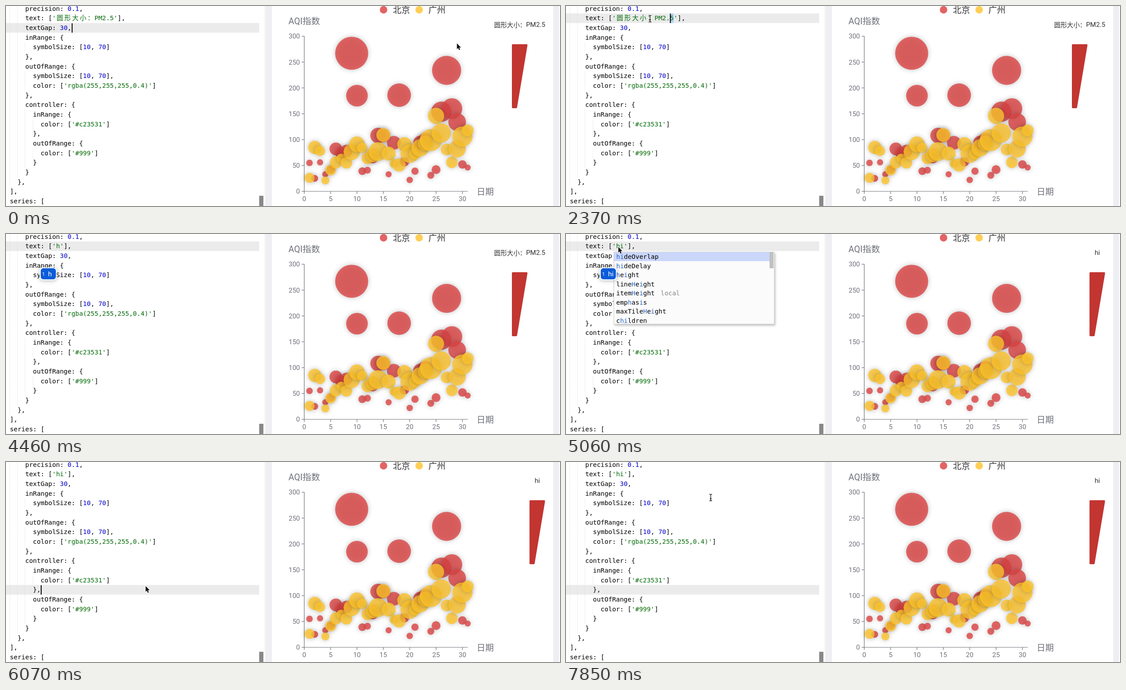
These frames come from a looping animation (1244 px wide and 450 px high, 8 s). An HTML page with a canvas:

```html
<!DOCTYPE html>
<html lang="zh">
<head>
<meta charset="utf-8">
<title>Chart editor</title>
<style>
html, body { margin: 0; width: 100%; height: 100%; overflow: hidden; background: #fff; }
canvas { display: block; }
</style>
</head>
<body>
<canvas id="stage" width="1244" height="450"></canvas>
<script>
const LOOP = 8000, TICK = 148.2;
const CELL = 8.64, ROW = 21.67, LEFT = 8.7, TOP = -5;
const CODE_FONT = '14.35px "DejaVu Sans Mono", monospace';
const sans = size => `${size}px Roboto, "Noto Sans CJK SC", "Noto Sans CJK", sans-serif`;
const cjk = size => `${size}px "Noto Sans CJK SC", "Noto Sans CJK", sans-serif`;
const stage = document.getElementById('stage');
const ctx = stage.getContext('2d');

const LABEL = '圆形大小:PM2.5'.replace(':', '\uff1a');
const codeLines = label => [
  '    precision: 0.1,',
  `    text: ['${label}'],`,
  '    textGap: 30,',
  '    inRange: {',
  '      symbolSize: [10, 70]',
  '    },',
  '    outOfRange: {',
  '      symbolSize: [10, 70],',
  "      color: ['rgba(255,255,255,0.4)']",
  '    },',
  '    controller: {',
  '      inRange: {',
  "        color: ['#c23531']",
  '      },',
  '      outOfRange: {',
  "        color: ['#999']",
  '      }',
  '    }',
  '  },',
  '],',
  'series: ['
];

// One entry per day: AQI, PM2.5
const beijing = [55,9, 25,11, 56,7, 33,7, 42,24, 82,58, 74,49, 78,55, 267,216, 185,127, 39,19,
  41,11, 64,38, 108,79, 108,63, 33,6, 94,66, 186,142, 57,31, 22,8, 39,15, 94,69, 99,73, 31,12,
  42,27, 154,117, 234,185, 160,120, 134,96, 52,24, 46,5];
const guangzhou = [26,37, 85,62, 78,38, 21,21, 41,42, 56,52, 64,30, 55,48, 76,85, 91,81, 84,39,
  64,51, 70,69, 77,105, 109,68, 73,68, 54,27, 51,61, 91,71, 73,102, 73,50, 84,94, 93,77, 99,130,
  146,84, 113,108, 81,48, 56,48, 82,92, 106,116, 118,50];

// Mouse path: time, x, y
const path = [
  [0, 1012, 84], [300, 1090, 90], [440, 1131, 96], [600, 1126, 92], [1037, 637, 75],
  [1340, 400, 62], [1630, 241, 39], [1920, 243, 29], [2225, 243, 28.5], [2370, 189, 28.5],
  [2520, 150, 29], [2670, 125, 29], [2960, 117, 29.5], [5000, 117, 29], [5560, 117, 29],
  [5770, 220, 170], [5920, 313, 279], [6530, 313, 279], [6670, 450, 230], [6970, 1000, 90],
  [7110, 1190, 42], [7260, 1196, 44], [7560, 950, 70], [7710, 603, 76], [7850, 325, 80]
];

function text(c, str, x, y, font, color, align = 'left', baseline = 'middle') {
  c.font = font;
  c.fillStyle = color;
  c.textAlign = align;
  c.textBaseline = baseline;
  c.fillText(str, x, y);
}

function rect(c, x, y, w, h, color) {
  c.fillStyle = color;
  c.fillRect(x, y, w, h);
}

function disc(c, x, y, r, color) {
  c.fillStyle = color;
  c.beginPath();
  c.arc(x, y, r, 0, 2 * Math.PI);
  c.fill();
}

function polygon(c, points) {
  c.beginPath();
  points.forEach(([x, y]) => c.lineTo(x, y));
  c.closePath();
}

function line(c, x1, y1, x2, y2) {
  c.beginPath();
  c.moveTo(x1, y1);
  c.lineTo(x2, y2);
  c.stroke();
}

function roundBox(x, y, w, h, r, color) {
  ctx.fillStyle = color;
  ctx.beginPath();
  ctx.roundRect(x, y, w, h, r);
  ctx.fill();
}

const chartX = day => 669.7 + day * 11.84;
const chartY = aqi => 417 - aqi * 1.1633;

function drawBubbles(c, data, color) {
  c.save();
  c.globalAlpha = 0.8;
  c.shadowBlur = 12;
  c.shadowColor = 'rgba(0,0,0,0.3)';
  for (let i = 0; i < data.length; i += 2) {
    const radius = (10 + 60 * data[i + 1] / 250) * 0.6;
    disc(c, chartX(i / 2 + 1), chartY(data[i]), radius, color);
  }
  c.restore();
}

function buildBackdrop() {
  const layer = document.createElement('canvas');
  layer.width = 1244;
  layer.height = 450;
  const c = layer.getContext('2d');
  rect(c, 0, 0, 1244, 450, '#fff');
  rect(c, 579, 0, 4, 450, '#f8f8fa');
  rect(c, 583, 0, 14, 450, '#eeeef3');
  rect(c, 1229, 0, 13, 450, '#eeeef3');
  c.fillStyle = '#888';
  c.fillRect(568.5, 427, 9.5, 23);

  const gray = '#6e7079';
  c.strokeStyle = gray;
  c.lineWidth = 1.2;
  line(c, 669.7, 67.5, 669.7, 417.5);
  line(c, 669.7, 417, 1037, 417);
  for (let v = 0; v <= 300; v += 50) {
    line(c, 664, chartY(v), 669.7, chartY(v));
    text(c, v, 660, chartY(v) + 1, sans(15), gray, 'right');
  }
  for (let d = 0; d <= 30; d += 5) {
    line(c, chartX(d), 417, chartX(d), 423);
    text(c, d, chartX(d), 435, sans(15), gray, 'center');
  }
  text(c, 'AQI指数', 669.7, 35.5, sans(19.6), gray, 'center');
  text(c, '日期', 1057, 417.5, cjk(19.2), gray);
  drawBubbles(c, beijing, '#dd4444');
  drawBubbles(c, guangzhou, '#fec42c');

  disc(c, 847.8, 8.5, 8.4, '#e16464');
  disc(c, 927.7, 8.5, 8.4, '#fecf57');
  text(c, '北京', 868.7, 9, cjk(19.2), '#333');
  text(c, '广州', 948.5, 9, cjk(19.2), '#333');
  return layer;
}

function drawVisualMap(changed) {
  const x = changed ? 1175.5 : 1136;
  if (changed) {
    text(ctx, 'hi', 1193, 43, sans(15), '#333', 'center');
  } else {
    text(ctx, LABEL.slice(0, 5), 1096, 43, cjk(14.4), '#333');
    text(ctx, LABEL.slice(5), 1211, 43, sans(15), '#333', 'right');
  }
  ctx.fillStyle = ctx.strokeStyle = '#c23531';
  ctx.lineJoin = 'round';
  ctx.lineWidth = 4;
  polygon(ctx, [[x + 2, 88], [x + 33, 88], [x + 9.6, 228], [x + 2, 228]]);
  ctx.fill();
  ctx.stroke();
}

const rowTop = row => TOP + row * ROW;

function drawLine(str, row) {
  const indent = str.search(/\S/), y = rowTop(row) + 15.7;
  for (let col = 0; col < indent; col += 2) {
    for (let d = 0; d < ROW; d += 2.4) {
      rect(ctx, Math.round(LEFT + col * CELL) - 1, rowTop(row) + d, 1, 1.2, '#dfdfdf');
    }
  }
  let x = LEFT;
  for (const token of str.split(/('[^']*'|\d+(?:\.\d+)?)/)) {
    const color = token[0] === "'" ? '#036a07' : /^\d/.test(token) ? '#0000cd' : '#000';
    for (const part of token.split(/([\u3000-\uffff])/)) {
      if (/[\u3000-\uffff]/.test(part)) {
        text(ctx, part, x + CELL, y, cjk(14.4), color, 'center', 'alphabetic');
        x += 2 * CELL;
      } else {
        text(ctx, part, x, y, CODE_FONT, color, 'left', 'alphabetic');
        x += part.length * CELL;
      }
    }
  }
}

function drawCaret(x, row) {
  rect(ctx, x, rowTop(row) + 0.5, 2, ROW - 0.5, '#000');
}

const between = (t, a, b) => t >= a && t < b;

function drawEditor(t) {
  const label = t < 4460 ? LABEL : t < 4610 ? 'h' : 'hi';
  const active = t < 2370 ? 2 : t < 5920 ? 1 : 13;
  const textStart = LEFT + 12 * CELL;
  rect(ctx, 0, rowTop(active), 568.5, ROW, '#ebebeb');

  let selectFrom = null;
  if (between(t, 2370, 4460)) {
    const cols = t < 2520 ? 14 : t < 2670 ? 8 : t < 2810 ? 4 : t < 2960 ? 2 : 0;
    selectFrom = textStart + cols * CELL;
    rect(ctx, selectFrom, rowTop(1), textStart + 15 * CELL - selectFrom, ROW, '#b5d5ff');
  }
  codeLines(label).forEach(drawLine);

  if (selectFrom !== null && !between(t, 3410, 3860)) drawCaret(selectFrom, 1);
  if (t < 300 || between(t, 750, 1200) || between(t, 1780, 2220)) drawCaret(147.5, 2);
  if (between(t, 5920, 6370) || between(t, 6900, 7400)) drawCaret(78, 13);
}

function shadow(blur, alpha, dx = 0, dy = 0) {
  ctx.shadowBlur = blur;
  ctx.shadowColor = `rgba(0,0,0,${alpha})`;
  ctx.shadowOffsetX = dx;
  ctx.shadowOffsetY = dy;
}

const completions = ['hideOverlap', 'hideDelay', 'height', 'lineHeight', 'itemHeight',
  'emphasis', 'maxTileHeight', 'children'];

function drawCompletions() {
  ctx.save();
  shadow(5, 0.25, 2, 3);
  rect(ctx, 107, 40, 361, 163, '#d3d3d3');
  ctx.restore();
  rect(ctx, 108, 41, 359, 161, '#fbfbfb');
  rect(ctx, 108, 41, 349, 20, '#cad6fa');
  rect(ctx, 457, 41, 9, 36, '#c1c1c1');
  completions.forEach((word, i) => {
    const y = 56 + i * 20.5;
    const h = word.search(/h/i), match = [h, word.indexOf('i', h)];
    [...word].forEach((ch, k) => {
      const color = match.includes(k) ? '#2d69c7' : '#000';
      text(ctx, ch, 112.8 + k * CELL, y, CODE_FONT, color, 'left', 'alphabetic');
    });
    if (word === 'itemHeight') text(ctx, 'local', 212.5, y, CODE_FONT, '#888', 'left', 'alphabetic');
  });
}

function drawCandidate(word) {
  ctx.save();
  shadow(10, 0.3, 0, 1);
  roundBox(75.5, 75, 38.5, 29, 8, '#fff');
  ctx.restore();
  roundBox(78, 77, 34, 25, 6, '#0b5cd8');
  text(ctx, '1', 81, 91, sans(11), '#fff');
  text(ctx, word, 94.5, 90, sans(15.5), '#fff');
}

function mouseAt(t) {
  const next = path.findIndex(p => p[0] > t);
  if (next < 0) return path[path.length - 1].slice(1);
  const [t0, x0, y0] = path[next - 1], [t1, x1, y1] = path[next];
  const k = (t - t0) / (t1 - t0);
  return [x0 + (x1 - x0) * k, y0 + (y1 - y0) * k];
}

function drawMouse(t) {
  if (between(t, 4460, 5060)) return;
  const [x, y] = mouseAt(Math.floor((t + 15) / TICK) * TICK);
  ctx.save();
  ctx.translate(x, y);
  ctx.lineJoin = 'round';
  if (x < 568 && !between(t, 5060, 7840)) {
    for (const [color, width] of [['rgba(255,255,255,0.7)', 3], ['#111', 1.3]]) {
      ctx.strokeStyle = color;
      ctx.lineWidth = width;
      ctx.beginPath();
      ctx.moveTo(-3, -7.5);
      ctx.quadraticCurveTo(0, -7.5, 0, -5.5);
      ctx.lineTo(0, 5.5);
      ctx.quadraticCurveTo(0, 7.5, -3, 7.5);
      ctx.moveTo(3, -7.5);
      ctx.quadraticCurveTo(0, -7.5, 0, -5.5);
      ctx.moveTo(0, 5.5);
      ctx.quadraticCurveTo(0, 7.5, 3, 7.5);
      ctx.moveTo(-2, 2.5);
      ctx.lineTo(2, 2.5);
      ctx.stroke();
    }
  } else {
    polygon(ctx, [[0.5, 0], [0.5, 13], [3.4, 10.4], [5.4, 15.2], [7.7, 14.2], [5.7, 9.6], [9.6, 9.4]]);
    ctx.strokeStyle = '#fff';
    ctx.lineWidth = 2;
    ctx.stroke();
    ctx.fillStyle = '#111';
    ctx.fill();
  }
  ctx.restore();
}

const backdrop = buildBackdrop();

function frame(now) {
  const t = now % LOOP;
  ctx.drawImage(backdrop, 0, 0);
  drawVisualMap(t >= 5060);
  drawEditor(t);
  if (between(t, 4610, 5620)) drawCompletions();
  if (between(t, 4460, 5620)) drawCandidate(t < 4610 ? 'h' : 'hi');
  drawMouse(t);
  requestAnimationFrame(frame);
}
requestAnimationFrame(frame);
</script>
</body>
</html>
```
